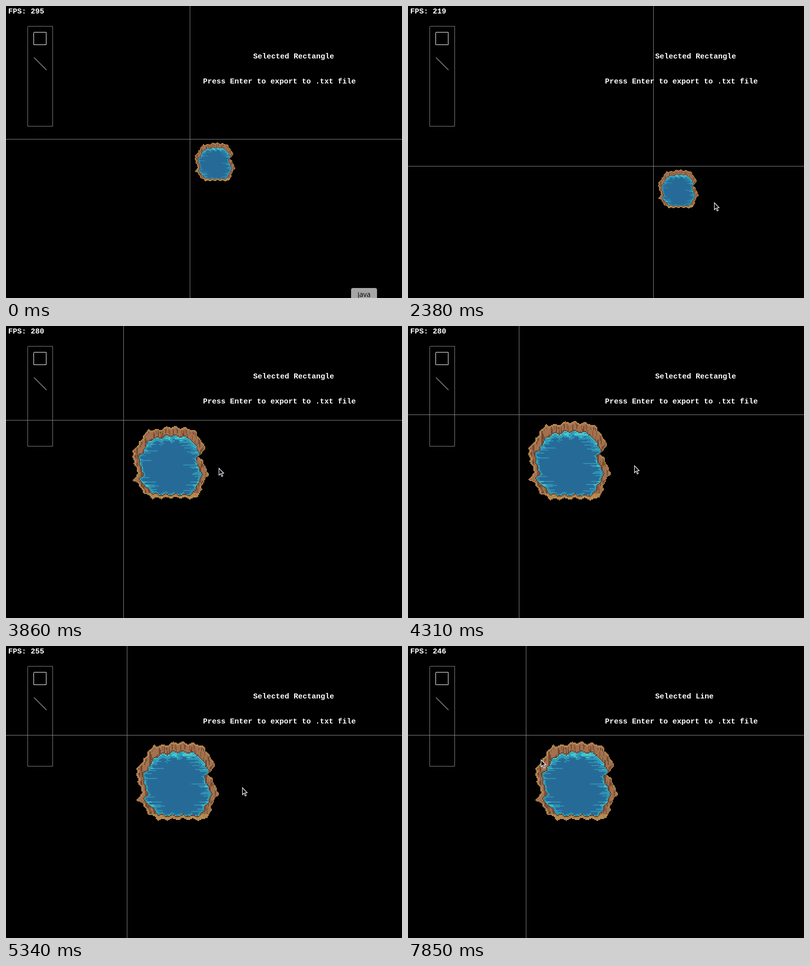
Recreate the animation shown at these times as an HTML page with a canvas. Size 793x584 px, loop 8 s.

```html
<!DOCTYPE html>
<html lang="en">
<head>
<meta charset="utf-8">
<title>Shape editor</title>
<style>
html, body { margin: 0; width: 100%; height: 100%; overflow: hidden; background: #000; }
canvas { display: block; }
</style>
</head>
<body>
<canvas id="stage" width="793" height="584"></canvas>
<script>
const ctx = document.getElementById('stage').getContext('2d');
const LOOP = 8000, HOLD = 300, STEP = 147.5;
const GREY = '#808080', WHITE = '#fff';
const MAX_ZOOM = 2.04, SPRITE_W = 82, SPRITE_H = 80;

// Lobes and notches of the bank, clockwise from the top left, at full zoom
const bank = [
  [36, 8], [62, 7], [80, 1], [100, 3], [125, 5], [137, 14], [153, 38], [158, 52],
  [144, 64], [156, 85], [165, 102], [152, 127], [147, 144], [135, 157], [92, 155],
  [45, 157], [26, 145], [14, 128], [0, 116], [13, 103], [6, 86], [2, 72], [0, 52],
  [13, 42], [22, 22]
];

function noise(x, y) {
  const v = Math.sin(x * 12.9898 + y * 78.233) * 43758.5453;
  return v - Math.floor(v);
}

function polygon(points) {
  const path = new Path2D();
  points.forEach(([x, y]) => path.lineTo(x, y));
  path.closePath();
  return path;
}

function smooth(points) {
  const path = new Path2D();
  points.forEach(([x, y], i) => {
    const [nx, ny] = points[(i + 1) % points.length];
    const mx = (x + nx) / 2, my = (y + ny) / 2;
    if (i) path.quadraticCurveTo(x, y, mx, my);
    else path.moveTo(mx, my);
  });
  const [x, y] = points[0], [nx, ny] = points[1];
  path.quadraticCurveTo(x, y, (x + nx) / 2, (y + ny) / 2);
  return path;
}

function makePond() {
  const sprite = document.createElement('canvas');
  sprite.width = SPRITE_W;
  sprite.height = SPRITE_H;
  const g = sprite.getContext('2d');
  const outer = polygon(bank);
  const inner = smooth(bank.map(([x, y]) => [14.5 + x * 0.83, 20 + y * 0.82]));
  const AIR = 0, ROCK = 1, WATER = 2;
  const kind = [];
  for (let y = 0; y < SPRITE_H; y++) {
    for (let x = 0; x < SPRITE_W; x++) {
      const px = (x + 0.5) * MAX_ZOOM, py = (y + 0.5) * MAX_ZOOM;
      // Scalloped edges
      const wx = px + 1.3 * Math.sin(py * 0.4), wy = py - 2 * Math.cos((px - 83) * 0.31);
      kind.push(g.isPointInPath(inner, wx, wy) ? WATER : g.isPointInPath(outer, wx, wy) ? ROCK : AIR);
    }
  }
  const at = (x, y) =>
    x < 0 || y < 0 || x >= SPRITE_W || y >= SPRITE_H ? AIR : kind[y * SPRITE_W + x];
  const run = (x, y, dx, dy) => {
    const k = at(x, y);
    let n = 0;
    while (at(x + dx * (n + 1), y + dy * (n + 1)) === k) n++;
    return n;
  };
  const touches = (x, y, k) =>
    at(x - 1, y) === k || at(x + 1, y) === k || at(x, y - 1) === k || at(x, y + 1) === k;

  function rock(x, y) {
    if (touches(x, y, WATER)) return '#68402a';
    if (touches(x, y, AIR) || y > 70) return noise(x, y) < 0.75 ? '#b98b50' : '#a97b4a';
    if (at(x, y - 2) === AIR || at(x - 2, y) === AIR) return '#b18150';
    const crack = noise(x, Math.floor((y + x % 3) / 5));
    return crack < 0.2 ? '#75492f' : crack < 0.4 ? '#895b3d' : '#a37150';
  }

  // How far a ripple reaches from the shore in a row
  function ripple(y, seed) {
    const r = noise(y, seed);
    return r > 0.8 ? 6 + (r - 0.8) * 45 : r * 3;
  }

  function water(x, y) {
    const up = run(x, y, 0, -1), left = run(x, y, -1, 0), right = run(x, y, 1, 0);
    const l = ripple(y, 3), r = ripple(y, 8), band = noise(Math.floor(x / 5), y);
    if (y < 28 && up < 4) return band < (up ? 0.2 : 0.7) ? '#44c6d1' : '#309ab5';
    if (y < 26 && up < 7 && band < 0.4) return '#2e91b0';
    if (left < l * 0.3 || right < r * 0.3) return noise(y, 5) < 0.35 ? '#40bfcc' : '#309ab5';
    if (left < l || right < r) return '#2e91b0';
    if (y > 66 && run(x, y, 0, 1) < 2 && band < 0.4) return '#2e91b0';
    return '#266b98';
  }

  for (let y = 0; y < SPRITE_H; y++) {
    for (let x = 0; x < SPRITE_W; x++) {
      const k = at(x, y);
      if (k === AIR) continue;
      g.fillStyle = k === ROCK ? rock(x, y) : water(x, y);
      g.fillRect(x, y, 1, 1);
    }
  }
  return sprite;
}

// Key poses: step, x, y
const originKeys = [
  [7, 368, 266], [15, 491, 320], [21, 253, 202], [28, 222, 177], [32, 259, 179], [36, 236, 178]
];
const cursorKeys = [
  [1, 717, 574], [7, 490, 339], [15, 613, 393], [21, 391, 291], [28, 453, 279], [32, 490, 284],
  [36, 467, 283], [40, 187, 108], [45, 69, 110], [46, 69, 110], [49, 355, 284], [52, 266, 227]
];
const fps = [295, 238, 219, 252, 280, 255, 277, 246];

const clamp = v => Math.max(0, Math.min(1, v));

function pose(keys, n) {
  const i = Math.max(1, keys.findIndex(k => k[0] >= n));
  const last = keys[keys.length - 1];
  const [a, b] = n > last[0] ? [last, last] : [keys[i - 1], keys[i]];
  const p = clamp((n - a[0]) / (b[0] - a[0] || 1));
  return [1, 2].map(j => Math.round(a[j] + (b[j] - a[j]) * p));
}

function text(s, x, y) {
  ctx.fillStyle = WHITE;
  ctx.font = 'bold 15px "Liberation Mono", monospace';
  ctx.textAlign = 'left';
  ctx.fillText(s, x, y);
}

// The top left corner pixel stays open
function box(x, y, size, h, color) {
  const l = x + 0.5, t = y + 0.5;
  ctx.strokeStyle = color;
  ctx.lineWidth = 1;
  ctx.beginPath();
  ctx.moveTo(x + 1, t);
  ctx.lineTo(l + size, t);
  ctx.lineTo(l + size, t + h);
  ctx.lineTo(l, t + h);
  ctx.lineTo(l, y + 1);
  ctx.stroke();
}

function toolbar() {
  box(43, 40, 50, 200, GREY);
  box(55, 52, 25, 25, WHITE);
  ctx.fillStyle = WHITE;
  for (let i = 0; i < 25; i++) ctx.fillRect(56 + i, 103 + i, 1, 1);
}

function tooltip() {
  ctx.fillStyle = '#a6a6a6';
  ctx.beginPath();
  ctx.roundRect(691, 564, 52, 30, 4);
  ctx.fill();
  ctx.fillStyle = '#000';
  ctx.font = '14px "Open Sans", sans-serif';
  ctx.textAlign = 'center';
  ctx.fillText('java', 717, 582);
}

const arrow = polygon([
  [0.5, 0.5], [0.5, 14.5], [3.8, 11.3], [6, 17], [8.2, 16], [6, 10.5], [10, 10.5]
]);

function cursor(x, y) {
  ctx.save();
  ctx.translate(x, y);
  ctx.fillStyle = '#000';
  ctx.strokeStyle = WHITE;
  ctx.lineWidth = 1.1;
  ctx.fill(arrow);
  ctx.stroke(arrow);
  ctx.restore();
}

const pond = makePond();

function draw(t) {
  const n = t < HOLD ? 0 : 1 + Math.floor((t - HOLD) / STEP);
  const [ox, oy] = pose(originKeys, n);
  const zoom = MAX_ZOOM ** clamp((n - 17) / 9);
  ctx.fillStyle = '#000';
  ctx.fillRect(0, 0, 793, 584);

  ctx.imageSmoothingEnabled = false;
  ctx.drawImage(pond, Math.round(ox + 9.5 * zoom), Math.round(oy + 6.6 * zoom),
    Math.round(SPRITE_W * zoom), Math.round(SPRITE_H * zoom));

  ctx.fillStyle = GREY;
  ctx.fillRect(ox, 0, 1, 584);
  ctx.fillRect(0, oy, 793, 1);
  toolbar();

  text('FPS: ' + fps[Math.floor((n + 6) / 7.5)], 4.5, 15);
  text('Selected ' + (n < 44 ? 'Rectangle' : 'Line'), 495, 105);
  text('Press Enter to export to .txt file', 394.5, 155);

  if (n < 2) tooltip();
  if (n > 0) cursor(...pose(cursorKeys, n));
}

function tick() {
  draw(performance.now() % LOOP);
  requestAnimationFrame(tick);
}
tick();
</script>
</body>
</html>
```
